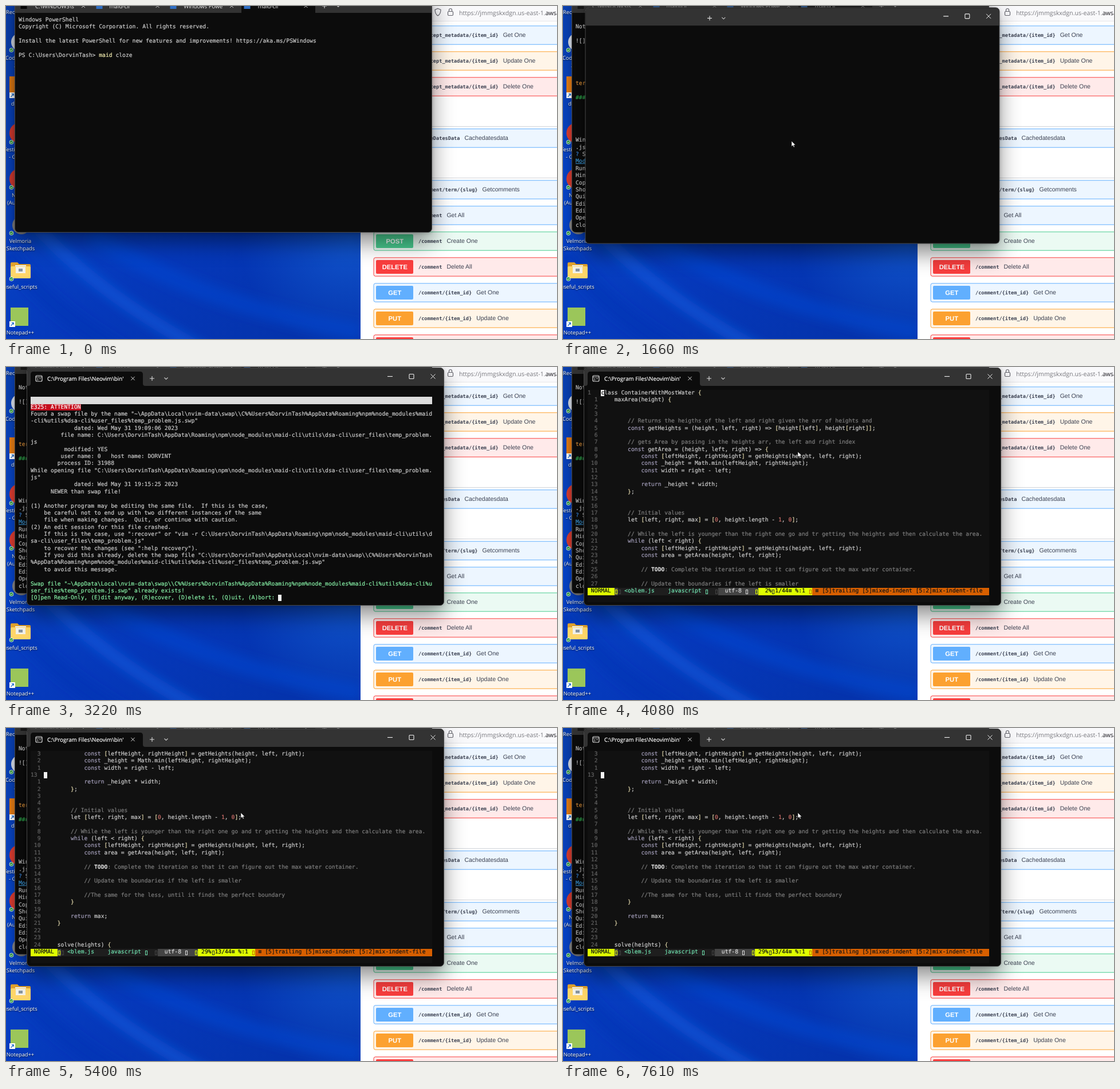
An HTML page for the animation above (8 s loop, 962x582 px).

```html
<!DOCTYPE html>
<html lang="en">
<head>
<meta charset="utf-8">
<title>Terminal session</title>
<style>
html, body { margin: 0; width: 100%; height: 100%; overflow: hidden; background: #0638bd; }
* { text-rendering: geometricPrecision; }
#stage { position: absolute; left: 0; top: 0; width: 962px; height: 582px; overflow: hidden; }
svg, .win { position: absolute; left: 0; top: 0; width: 962px; height: 582px; }
.ui { font-family: "Open Sans", "Noto Sans", sans-serif; }
.frame { position: absolute; box-sizing: border-box; background: #0c0c0c; border: 1px solid #484848; border-radius: 7px; overflow: hidden; }
.shade { position: absolute; border-radius: 7px; box-shadow: 0 18px 38px rgba(0,0,0,.45), 0 0 6px rgba(0,0,0,.25); }
.idle .shade { box-shadow: 0 4px 14px rgba(0,0,0,.25); }
.idle .tabs { opacity: .6; }
.bar { position: absolute; left: 0; right: 0; top: 0; background: #333; }
.term { position: absolute; margin: 0; color: #ccc; white-space: pre;
  font: 9.71px/12.37px "DejaVu Sans Mono", "Noto Sans Mono", monospace; -webkit-text-stroke: .2px; }
.term div { height: 12.37px; width: 701.4px; }
.term i { position: absolute; font-style: normal; height: 12.37px; }
.cur { background: #f2f2f2; color: #111; }
.num { color: #626262; }
.com { color: #7d7d7d; }
.todo { color: #d8d8d8; font-weight: bold; }
.key { color: #a29db8; }
.dig { color: #d0706a; }
.br { color: #e6dcae; }
#code { background: #111; width: 701.4px; height: 371px; }
#bar1 { position: absolute; left: 22px; top: 93px; width: 1px; height: 12px; background: #ccc; }
</style>
</head>
<body>
<div id="stage">
  <svg id="desk"></svg>
  <svg id="page"></svg>
  <div class="win" id="old">
    <div class="shade" style="left:16px;top:-20px;width:728px;height:416px"></div>
    <div class="frame" style="left:15px;top:-20px;width:729px;height:416px">
      <div class="bar" style="height:31px"></div>
    </div>
    <svg class="tabs ui" id="oldTabs"></svg>
    <pre class="term" id="shell" style="left:22px;top:18.9px"></pre>
    <div id="bar1"></div>
  </div>
  <div class="win" id="fresh" style="transform-origin:400px 211px">
    <div class="shade" style="left:36px;top:2px;width:728px;height:414px"></div>
    <div class="frame" style="left:36px;top:1px;width:729px;height:416px">
      <div class="bar" style="height:31px"></div>
    </div>
    <svg class="ui" id="freshTabs"></svg>
    <pre class="term" id="swap" style="left:43px;top:39.8px"></pre>
    <pre class="term" id="code" style="left:43px;top:39.8px"></pre>
  </div>
  <svg id="pointer">
    <path id="arrow" d="M0 0V9.6L2.3 7.6 3.9 11 5.4 10.3 3.9 7H7Z" fill="#fff" stroke="#111" stroke-width=".6"/>
    <g id="ring" fill="none" stroke-width="3">
      <circle r="8" stroke="#b9dcfa"/>
      <path d="M0-8A8 8 0 0 1 8 0" stroke="#1b78d8"/>
    </g>
  </svg>
</div>
<script>
const LOOP = 8000, CW = 5.845, LH = 12.37, COLS = 120, ROWS = 30;
const $ = id => document.getElementById(id);
const esc = s => s.replace(/&/g, '&amp;').replace(/</g, '&lt;');
const tag = (cls, s) => `<span class="${cls}">${s}</span>`;
const ink = (color, s) => `<span style="color:${color}">${s}</span>`;
const text = (x, y, s, size, fill, more = '') =>
  `<text x="${x}" y="${y}" font-size="${size}" fill="${fill}" ${more}>${s}</text>`;
const rect = (x, y, w, h, fill, more = '') =>
  `<rect x="${x}" y="${y}" width="${w}" height="${h}" fill="${fill}" ${more}/>`;
const dot = (x, y, r, fill) => `<circle cx="${x}" cy="${y}" r="${r}" fill="${fill}"/>`;
const line = (d, color, w = 1) => `<path d="${d}" fill="none" stroke="${color}" stroke-width="${w}"/>`;
const cross = (x, y, r, color) => line(`M${x - r} ${y - r}l${2 * r} ${2 * r}m0 ${-2 * r}l${-2 * r} ${2 * r}`, color);
const plus = (x, y) => line(`M${x - 4} ${y}h8m-4-4v8`, '#ddd', 1.1);
const chevron = (x, y) => line(`M${x - 3} ${y - 1.5}l3 3 3-3`, '#ccc', 1.1);
// Latest entry whose time has come
const at = (steps, t) => steps.reduce((hit, s) => s[0] <= t ? s : hit, null);

function drawDesk() {
  const label = (x, y, s, anchor = 'start') =>
    text(x, y, s, 9.3, '#fff', `text-anchor="${anchor}" style="text-shadow:0 1px 2px #012"`);
  const check = y => dot(9.5, y, 3.8, '#fff') + dot(9.5, y, 3.1, '#2e9a43') + line(`M7.8 ${y}l1.3 1.4 2.2-2.6`, '#fff', .9);
  const shortcut = y => rect(6, y - 5, 10, 10, '#fff') + line(`M8.5 ${y + 2.8}L13 ${y - 2}M9.8 ${y - 2.4}H13.2V${y + 1}`, '#1667c8', 1.2);
  $('desk').setAttribute('class', 'ui');
  $('desk').innerHTML = `
    <defs>
      <linearGradient id="sky" x2="1" y2=".75">
        <stop offset="0" stop-color="#0a3fae"/><stop offset=".3" stop-color="#0743c6"/>
        <stop offset=".55" stop-color="#0538ba"/><stop offset=".8" stop-color="#0433ac"/>
      </linearGradient>
      <radialGradient id="glow" gradientUnits="userSpaceOnUse" cx="600" cy="410" r="190">
        <stop offset="0" stop-color="#1560d6" stop-opacity=".7"/><stop offset="1" stop-color="#1560d6" stop-opacity="0"/>
      </radialGradient>
      <filter id="soft" x="-30%" y="-30%" width="160%" height="160%"><feGaussianBlur stdDeviation="9"/></filter>
    </defs>
    ${rect(0, 0, 962, 582, 'url(#sky)')}${rect(400, 380, 230, 202, 'url(#glow)')}
    <g fill="none" filter="url(#soft)">
      <path d="M40 370Q150 500 360 610" stroke="#1a66ea" stroke-width="22" opacity=".5"/>
      <path d="M150 400Q330 520 620 570" stroke="#0a4ad8" stroke-width="30" opacity=".45"/>
      <path d="M0 430Q80 540 230 620" stroke="#0332b4" stroke-width="30" opacity=".5"/>
    </g>
    ${dot(25, 63, 16, '#d5dbe6')}${rect(6, 123, 36, 37, '#e07a14')}
    ${dot(24, 222, 18, '#d63b30')}${dot(24, 302, 18, '#d63b30')}${dot(27, 383, 16, '#858585')}
    <path d="M8 450q0-2 2-2h10l3 3h18q2 0 2 2v21q0 2-2 2H10q-2 0-2-2z" fill="#dfa12e"/>
    ${rect(16, 453, 19, 12, '#f4f4f0')}
    <path d="M8 457q0-2 2-2h31q2 0 2 2v17q0 2-2 2H10q-2 0-2-2z" fill="#ffd669"/>
    ${rect(17, 456, 17, 11, '#f2f1ea')}${rect(22, 459, 7, 5, '#8a96a0')}
    ${rect(8, 527, 31, 32, '#9bc65a')}
    ${[77, 238, 317, 397, 477].map(check).join('')}${shortcut(156)}${shortcut(556)}
    ${label(0, 13.5, 'Rec')}${label(-1, 94, 'Cod')}${label(14, 107, '2')}${label(9, 174, 'd')}
    ${label(-4, 253.5, 'Testi')}${label(5, 266.5, '- G')}${label(10, 333.5, 'N')}${label(2, 346.5, '(Au')}
    ${label(25, 413.5, 'Velmoria', 'middle')}${label(25.5, 426.5, 'Sketchpads', 'middle')}
    ${label(25, 493.5, 'useful_scripts', 'middle')}${label(25, 573.5, 'Notepad++', 'middle')}`;
}

function drawPage() {
  const hue = { GET: '#61affe', POST: '#49cc90', PUT: '#fca130', DELETE: '#f93e3e' };
  const meta = '/concept_metadata/{item_id}', item = '/comment/{item_id}';
  const ops = [
    [51, 'GET', meta, 'Get One'], [96, 'PUT', meta, 'Update One'], [141, 'DELETE', meta, 'Delete One'],
    [231, 'GET', 'cacheDatesData', 'Cachedatesdata'], [321, 'GET', '/comment/term/{slug}', 'Getcomments'],
    [366, 'GET', '/comment', 'Get All'], [411, 'POST', '/comment', 'Create One'],
    [456, 'DELETE', '/comment', 'Delete All'], [501, 'GET', item, 'Get One'],
    [546, 'PUT', item, 'Update One'], [591, 'DELETE', item, 'Delete One']];
  const op = ([y, verb, path, note]) =>
    rect(642, y - 16.2, 360, 32.4, hue[verb], `fill-opacity=".11" stroke="${hue[verb]}" rx="3"`) +
    rect(646, y - 12, 65, 24, hue[verb], 'rx="2"') +
    text(678.8, y + 4, verb, 11.2, '#fff', 'text-anchor="middle" font-weight="bold"') +
    text(720, y + 3.2, `<tspan font-family="DejaVu Sans Mono, monospace" font-size="8.6" font-weight="bold">${path}</tspan><tspan dx="8">${note}</tspan>`, 10.5, '#3b4151');
  $('page').setAttribute('font-family', 'Liberation Sans, Arial, sans-serif');
  $('page').innerHTML = rect(619, 0, 343, 582, '#fff') + rect(619, 0, 343, 26, '#f9f9fb') + rect(619, 26, 343, 1, '#e6e6ea') +
    line('M754 4.5l5 2c0 5-1 8-5 10.5c-4-2.5-5-5.5-5-10.5z', '#66666e', 1.2) +
    rect(771.5, 9.5, 9, 7, 'none', 'rx="1.5" stroke="#66666e" stroke-width="1.2"') + line('M773.5 9V7a2.5 2.5 0 0 1 5 0v2', '#66666e', 1.2) +
    `<g class="ui">${text(791, 15.5, 'https://jmmgskxdgn.us-east-1.<tspan fill="#15141a">awsa</tspan>', 10.67, '#77777d')}</g>` +
    rect(634, 210, 328, 1, '#d3d5d9') + rect(634, 300, 328, 1, '#d3d5d9') + ops.map(op).join('');
}

function drawTabs() {
  const names = ['C:\\WINDOWS\\s', 'maid-cli', 'Windows Powe', 'maid-cli'];
  $('oldTabs').innerHTML = rect(411, -10, 129, 22, '#0c0c0c') + names.map((s, i) => {
    const x = 31 + i * 131 - (i > 0 ? 2 * i - 4 : 0) - (i ? 1 : 0);
    return rect(x - 5.5, -5, 11, 10, i ? '#2f6fc4' : '#050505') + text(51 + i * 129.6, 3.5, s, 9.66, '#eee') + cross(135 + i * 129.5, 0, 3, '#ccc');
  }).join('') + plus(556, 0) + chevron(580, 0);
  $('freshTabs').innerHTML = `<g id="tab">
      <path d="M39 33q4 0 4-4V13q0-5 5-5H234q5 0 5 5v16q0 4 4 4z" fill="#0c0c0c"/>
      ${rect(52, 15, 11, 10, 'none', 'rx="2" stroke="#ddd" stroke-width="1.2"')}${line('M52 17.5h11M54 20.5h2.5M58 20.5h3M54 22.7h2.5', '#ddd', .9)}
      ${text(72, 23.7, "C:\\Program Files\\Neovim\\bin'", 9.8, '#fff', 'stroke="#fff" stroke-width=".2"')}${cross(221.5, 20, 3.2, '#ddd')}</g>` +
    plus(255, 20) + chevron(279.5, 20) + line('M666 16.5h9', '#eee', 1.1) +
    rect(704, 12.5, 8, 8, 'none', 'stroke="#eee" stroke-width="1.1" rx="1"') + cross(745.5, 16.5, 4, '#eee');
}

const user = 'DorvinTash';
const dir = `C:\\Users\\${user}\\AppData\\Roaming\\npm\\node_modules\\maid-cli\\utils\\dsa-cli\\user_files\\`;
const file = dir + 'temp_problem.js';
const swapName = `swap\\\\C%%Users%${user}%` + file.split(user + '\\')[1].replace(/\\/g, '%') + '.swp';
const wrap = s => s.match(new RegExp(`.{1,${COLS}}`, 'g')) || [''];

const prompt = ['Windows PowerShell', 'Copyright (C) Microsoft Corporation. All rights reserved.', '',
  'Install the latest PowerShell for new features and improvements! https://aka.ms/PSWindows', '',
  `PS C:\\Users\\${user}> ${ink('#f4eeb0', 'maid')} cloze`].join('\n');

const menu = ['', 'Notes:', '', '![](container.png)', '', '', '', '', '',
  ink('#e0933a', 'terms: container, boundary, area'), '', ink('#2fae4e', '### Container With Most Water'), '', '', '', '', '',
  ...wrap('Windows file path is ' + file),
  ink('#3b8eea', '?') + ' Select an option: (Use arrow keys)',
  `<span style="color:#3b9de0;text-decoration:underline">Modify the problem</span>`,
  'Run the tests', 'Hint', 'Copy the solution', 'Show the answer', 'Quit', 'Edit the notes', 'Edit the problem',
  'Open in editor', 'cloze'].join('\n');

const pad = (n, s) => ' '.repeat(n) + s;
const green = s => wrap(s).map(x => ink('#86f0a6', x));
const swapLines = ['', 'BAR', '<span style="background:#c50f1f;color:#fff">E325: ATTENTION</span>',
  ...wrap(`Found a swap file by the name "~\\AppData\\Local\\nvim-data\\${swapName}"`),
  pad(13, 'dated: Wed May 31 19:09:06 2023'), ...wrap(pad(9, 'file name: ' + file)),
  pad(10, 'modified: YES'), pad(9, 'user name: 0   host name: DORVINT'), pad(8, 'process ID: 31988'),
  ...wrap(`While opening file "${file}"`), pad(13, 'dated: Wed May 31 19:15:25 2023'), pad(6, 'NEWER than swap file!'), '',
  '(1) Another program may be editing the same file.  If this is the case,',
  '    be careful not to end up with two different instances of the same',
  '    file when making changes.  Quit, or continue with caution.',
  '(2) An edit session for this file crashed.',
  ...wrap(`    If this is the case, use ":recover" or "vim -r ${file}"`),
  '    to recover the changes (see ":help recovery").',
  ...wrap(`    If you did this already, delete the swap file "C:\\Users\\${user}\\AppData\\Local\\nvim-data\\${swapName}"`),
  '    to avoid this message.', '',
  ...green(`Swap file "~\\AppData\\Local\\nvim-data\\${swapName}" already exists!`),
  ink('#86f0a6', '[O]pen Read-Only, (E)dit anyway, (R)ecover, (D)elete it, (Q)uit, (A)bort: ') + tag('cur', ' ')];

const source = `class ContainerWithMostWater {
    maxArea(height) {


        // Returns the heigths of the left and right given the arr of heights and
        const getHeights = (height, left, right) => [height[left], height[right]];

        // gets Area by passing in the heights arr, the left and right index
        const getArea = (height, left, right) => {
            const [leftHeight, rightHeight] = getHeights(height, left, right);
            const _height = Math.min(leftHeight, rightHeight);
            const width = right - left;

            return _height * width;
        };


        // Initial values
        let [left, right, max] = [0, height.length - 1, 0];

        // While the left is younger than the right one go and tr getting the heights and then calculate the area.
        while (left < right) {
            const [leftHeight, rightHeight] = getHeights(height, left, right);
            const area = getArea(height, left, right);

            // TODO: Complete the iteration so that it can figure out the max water container.

            // Update the boundaries if the left is smaller

            //The same for the less, until it finds the perfect boundary
        }

        return max;
    }


    solve(heights) {
        return this.maxArea(heights);
    }
}`.split('\n');

function paint(s) {
  return s.replace(/(\/\/.*)|\b(const|return|while)\b|\b(\d+)\b|([{}[\]])|</g, (m, com, key, dig, br) =>
    com ? tag('com', com.replace('TODO', tag('todo', 'TODO'))) :
    key ? tag('key', key) : dig ? tag('dig', dig) : br ? tag('br', br) : '&lt;');
}

function statusLine(cursor) {
  const cell = (col, s, fg, bg = 'none', n = s.length) =>
    `<i style="left:${col * CW}px;top:${28 * LH}px;width:${n * CW}px;color:${fg};background:${bg}">${esc(s)}</i>`;
  const box = (col, color) =>
    `<i style="left:${col * CW + 1}px;top:${28 * LH + 2.5}px;width:2px;height:6px;border:1px solid ${color}"></i>`;
  const d = String(cursor).length - 1, lime = '#dfff00', mint = '#6fe0ae';
  const pct = String(Math.floor(cursor * 100 / 44)).padStart(3);
  return cell(0, ' NORMAL ', '#111', lime) + cell(8, '', '', '#444', 1) + box(8, lime) +
    cell(9, '', '', '#1e1e1e', 30) + box(9, '#444') +
    cell(11, '<' + 'oblem.js'.slice(d), mint) + cell(24 - d, 'javascript', mint) + box(35 - d, mint) + box(38 - d, '#444') +
    cell(39 - d, '  utf-8', '#ddd', '#444', 12) + box(47 - d, '#ddd') + box(50 - d, lime) +
    cell(51 - d, pct + '% ' + cursor + '/44≡ %:1', '#111', lime, 16 + d) + box(55 - d, '#333') + box(66, '#d75f00') +
    cell(67, ' ≡ [5]trailing [5]mixed-indent [5:2]mix-indent-file', '#151515', '#d75f00', 53);
}

function codeView(top, cursor) {
  let out = '';
  for (let n = top; n < top + 28; n++) {
    const s = source[n - 1] || '', here = n === cursor;
    const gutter = here ? String(n).padEnd(4) : String(Math.abs(n - cursor)).padStart(3) + ' ';
    const body = here ? tag('cur', s[0] || ' ') + paint(s.slice(1)) : paint(s);
    out += `<div>${tag('num', gutter)}${body}</div>`;
  }
  return out + statusLine(cursor);
}

function swapView(count) {
  const rows = Array(ROWS - count).fill('').concat(swapLines.slice(0, count));
  return rows.map(s => s === 'BAR' ? '<div style="background:#dcdcdc"></div>' : `<div>${s}</div>`).join('');
}

// [time, scale, opacity]
const opening = [[1520, .92, .35], [1590, .972, .85], [1660, .993, 1], [1730, .998, 1], [1800, 1, 1]];
// [time, x, y]; no place means hidden
const mouse = [[1520, 399, 236], [1730, 401, 222], [1800, 404, 196], [1870, 408, 166], [1940, 410, 148], [2270], [4080, 410, 148]];
// [time, printed rows]
const printing = [[2360, 6], [2440, 12], [2520, 18], [2600, 24], [2680, 28], [2760, 30]];
// [time, first visible line, cursor line]
const scrolling = [[4080, 1, 1], [4810, 4, 4], [4880, 7, 7], [4940, 10, 10], [5000, 13, 13], [5400, 10, 13],
  [5460, 7, 13], [5730, 4, 13], [6530, 1, 13], [7340, 4, 13], [7410, 7, 13], [7610, 10, 13]];

const shown = {};
function fill(id, key, make) {
  if (shown[id] === key) return;
  shown[id] = key;
  $(id).innerHTML = make();
}
const show = (id, on) => { $(id).style.visibility = on ? 'inherit' : 'hidden'; };

function render(t) {
  const open = at(opening, t), place = at(mouse, t), print = at(printing, t), view = at(scrolling, t);
  fill('shell', t >= 920, () => t >= 920 ? menu : prompt);
  show('bar1', t >= 390 && t < 920);
  $('old').classList.toggle('idle', t >= 1590);
  $('fresh').style.visibility = open ? 'visible' : 'hidden';
  if (open) {
    $('fresh').style.transform = open[1] < 1 ? `scale(${open[1]})` : 'none';
    $('fresh').style.opacity = open[2];
  }
  show('tab', t >= 1870);
  show('swap', print && !view);
  show('code', view);
  if (print) fill('swap', print[1], () => swapView(print[1]));
  if (view) fill('code', view.slice(1).join(), () => codeView(view[1], view[2]));
  show('arrow', place && place.length > 1);
  if (place && place.length > 1) $('arrow').setAttribute('transform', `translate(${place[1]} ${place[2]})`);
  show('ring', t >= 3030 && t < 3220);
  $('ring').setAttribute('transform', `translate(410 148) rotate(${t < 3120 ? 0 : 110})`);
}

drawDesk();
drawPage();
drawTabs();
const start = performance.now();
function tick() {
  render((performance.now() - start) % LOOP);
  requestAnimationFrame(tick);
}
tick();
</script>
</body>
</html>
```
